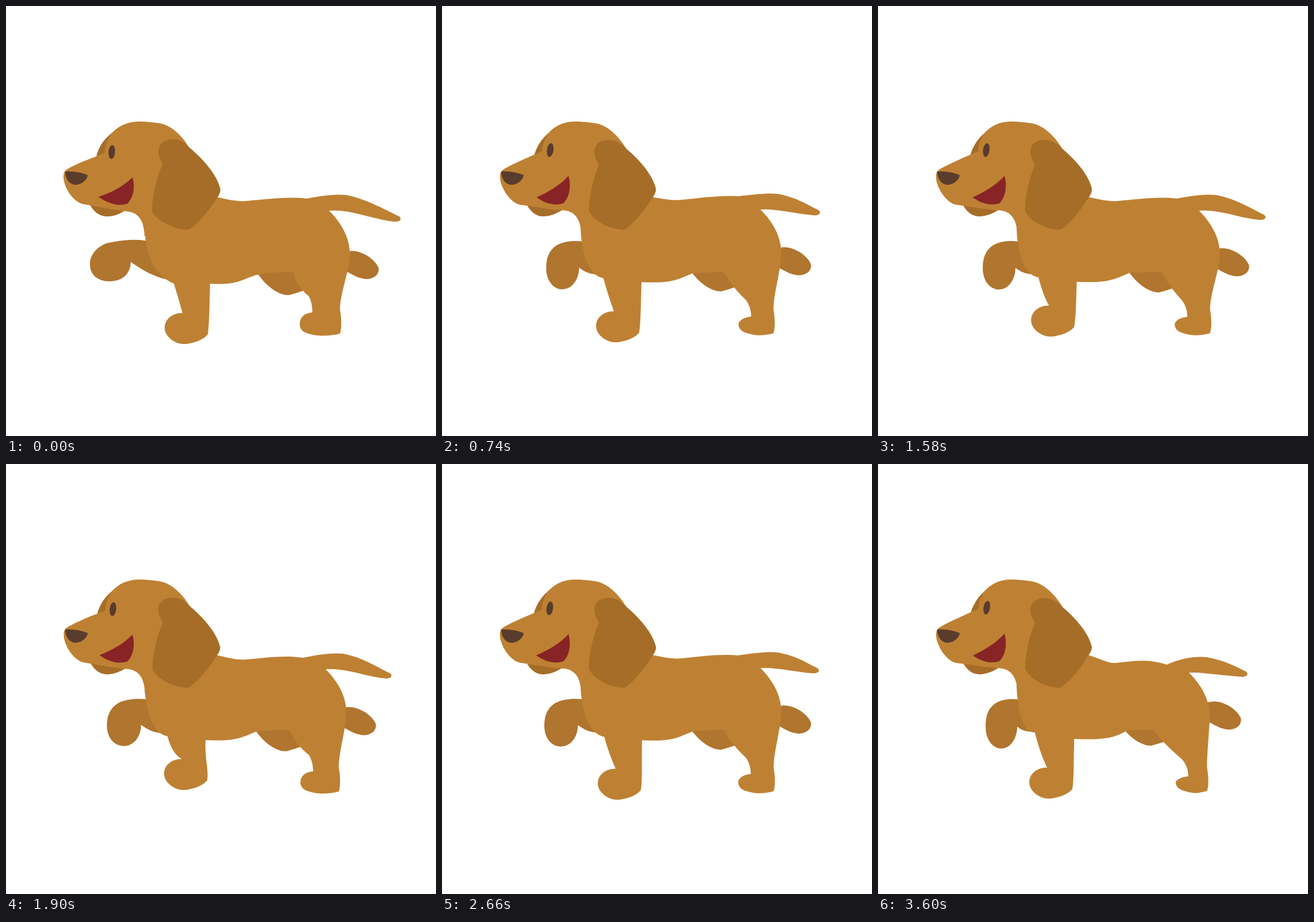
An HTML page with a canvas that plays this animation: 748 px wide and 748 px high, repeating every 3.7 s.

```html
<!DOCTYPE html>
<html lang="en">
<head>
<meta charset="utf-8">
<title>Walking puppy</title>
<style>
  html, body { margin: 0; width: 100%; height: 100%; overflow: hidden; background: #fff; }
  canvas { display: block; }
</style>
</head>
<body>
<canvas id="stage" width="748" height="748"></canvas>
<script>
const ctx = document.getElementById('stage').getContext('2d');
const LOOP = 3700, STEPS = 45;
const COAT = '#be8133', FAR = '#b0752e', EAR = '#a66d28', DARK = '#5a3c2c', MOUTH = '#882426';

// Slow sway over the loop: step, rump x/y offset, tail tip x/y, ground height.
const SWAY = [
  [0, 0, 0, 687, 372, 588],
  [9, -8, -2, 658, 361, 585],
  [15, -1, -1, 678, 368, 583],
  [23, -6, 1, 671, 370, 567],
  [33, -8, -1, 656, 361, 584],
  [39, 0, 0, 680, 372, 588],
  [44, -21, 7, 643, 367, 582]
];

// Fast leg cycle: phase, head tilt, paw curl, near front foot x, shoulder offset, hind tuck.
const CYCLE = 4.83;
const GAIT = [
  [-1.15, .4, .72, 275, -8, .2],
  [-.81, .7, .78, 271, -7, .7],
  [-.66, .85, .86, 268, -8, .8],
  [.36, .9, .93, 263, -12, .95],
  [.52, 1.05, 1.02, 263, -14, 1.15],
  [1.2, 0, 0, 276, 0, 0],
  [2.4, 0, 0, 298, 5, -.1],
  [3.68, .4, .72, 275, -8, .2]
];

// Path pairs share one structure so that their numbers can be blended.
const HEAD = [
  'M100 297C100 290 102 286 108 283C125 273 150 264 171 257C172 245 176 232 184 221C196 208 212 201 232 201C245 201 262 203 272 205C292 211 308 228 319 247L368 335L300 400L241 400C240 372 230 357 205 357C185 354 160 349 136 345C117 342 100 315 100 297Z',
  'M101 297C101 290 103 286 109 283C125 274 150 263 175 252C175 243 178 232 186 220C198 208 212 201 232 201C245 201 262 203 272 205C292 211 308 228 320 247L368 335L300 400L243 400C242 372 233 355 207 355C187 354 160 349 136 346C119 343 101 315 101 297Z'
];
const FAR_EAR = [
  'M157 262C161 245 170 232 184 221L190 250ZM146 346C153 358 162 366 176 366C190 366 200 360 207 356L170 340Z',
  'M161 259C166 243 175 229 188 219L192 250ZM149 348C155 358 164 366 177 366C191 365 201 360 209 355L172 340Z'
];
const SMILE = [
  'M161 332C185 324 205 313 220 298C225 315 222 333 211 344C196 349 178 344 161 332Z',
  'M165 333C186 323 206 311 220 295C225 312 222 333 211 343C196 348 180 344 165 333Z'
];
const NEAR_EAR = [
  'M265 254C265 238 277 232 290 232C303 232 312 238 320 247C345 268 368 295 373 319C373 325 370 330 367 334C352 357 338 374 322 387C318 390 312 390 305 388C283 384 262 372 254 358C254 330 262 300 272 276C271 270 265 264 265 254Z',
  'M265 255C265 239 277 233 290 233C303 234 312 239 320 248C345 269 367 295 372 318C372 324 370 328 366 333C351 357 337 374 321 387C318 390 312 390 305 388C283 384 263 372 256 356C256 330 263 300 273 277C271 270 265 264 265 255Z'
];
const NOSE = 'M103 288C118 287 132 290 142 294C142 302 131 311 121 311C110 311 103 300 103 288Z';
const FAR_HIND = 'M438 466C455 490 475 503 492 503C530 493 565 475 595 463C606 470 618 475 628 475C643 474 650 465 648 455C640 437 615 425 600 426C585 428 560 435 500 440Z';

const RAISED = 'M242 408C220 405 195 408 174 413C155 421 146 435 146 449C146 468 160 479 180 479C203 479 217 465 217 445C235 458 258 472 282 476L300 430Z';
const CURLED = 'M246 410C232 408 215 409 203 417C190 427 187 440 187 457C187 480 200 495 214 495C232 495 242 475 242 457C250 463 258 467 272 465L300 430Z';
const REACH = 'M244 408C215 402 175 402 140 414C112 416 96 430 96 446C97 462 115 473 135 475C155 474 165 465 172 455C200 465 240 478 285 476L300 430Z';
const PLANTED = 'M246 410C225 440 215 480 210 520C190 515 168 530 168 548C170 568 190 579 210 577C230 575 245 568 248 560C250 520 270 490 290 476L300 430Z';

const lerp = (a, b, t) => a + (b - a) * t;

function blend(a, b, t) {
  const target = b.match(/-?[\d.]+/g);
  let n = 0;
  return a.replace(/-?[\d.]+/g, v => lerp(+v, +target[n++], t).toFixed(2));
}

// Finds the keys around a position; the first entry of each key is its position.
function span(keys, at) {
  let k = 0;
  while (k < keys.length - 2 && at >= keys[k + 1][0]) k++;
  const a = keys[k], b = keys[k + 1];
  return { a, b, t: (at - a[0]) / (b[0] - a[0]) };
}

function sample(keys, at) {
  const { a, b, t } = span(keys, at);
  return a.map((v, i) => lerp(v, b[i], t));
}

const lifted = ([phase, , curl]) => [phase, blend(RAISED, CURLED, curl)];
const FAR_FRONT = [...GAIT.slice(0, 6).map(lifted), [1.95, REACH], [2.75, PLANTED], lifted(GAIT[7])];

function farFront(phase) {
  const { a, b, t } = span(FAR_FRONT, phase);
  return blend(a[1], b[1], t);
}

function fill(path, color) {
  ctx.fillStyle = color;
  ctx.fill(new Path2D(path));
}

// Each fourth step is brief: one long step, then blocks of 100, 100, 100, 20 ms.
function stepAt(ms) {
  if (ms < 100) return 0;
  const block = Math.floor((ms - 100) / 320);
  const rest = (ms - 100) % 320;
  return Math.min(STEPS - 1, 1 + block * 4 + Math.floor(rest / 100));
}

// The walk starts ahead of its even rhythm and settles into it.
function phaseAt(step) {
  const beat = step + 1.2 * Math.max(0, 1 - step / 8);
  return (beat - GAIT[0][0]) % CYCLE + GAIT[0][0];
}

function torso(rx, ry, tx, ty, hx) {
  const x = n => n + rx, y = n => n + ry, belly = hx * .35;
  return `M300 240L360 331C380 335 400 ${y(341)} ${420 + rx * .3} ${y(339)}
    C${455 + rx * .5} ${y(336)} ${x(490)} ${y(331)} ${x(523)} ${335 + ry * 2}
    C${x(550)} ${y(330)} ${x(575)} ${y(327)} ${x(593)} ${y(329)}
    C${x(627)} ${y(336)} ${tx - 28} ${ty - 18} ${tx - 3} ${ty - 6}
    C${tx + 3} ${ty - 1} ${tx - 2} ${ty + 4} ${tx - 12} ${ty + 3}
    C${tx - 37} ${ty + 1} ${x(610)} ${y(359)} ${x(588)} ${y(357)}
    Q${x(575)} ${y(355)} ${x(562)} ${y(356)}
    C${x(582)} ${y(376)} ${x(598)} ${y(402)} ${x(598)} ${y(430)}
    L${x(590)} 470L${499 + rx * .8} 463
    C480 462 458 464 ${440 + rx * .2} ${467 + belly}
    C420 471 410 ${481 + belly} 385 ${483 + belly}
    Q370 ${484 + belly} ${355 + hx} ${483 + belly}
    L${292 + hx * 1.4} ${483 + hx * 1.2}C${262 + hx * .4} 470 243 440 241 385Z`;
}

function nearFront(fx, bottom, hx) {
  const x = n => fx + n, y = n => bottom + n;
  return `M${292 + hx * 1.4} ${483 + hx * 1.2}
    Q${299 + hx * 1.2} 505 ${x(31)} ${y(-54)}
    C${x(13)} ${y(-54)} ${x(0)} ${y(-43)} ${x(0)} ${y(-28)}
    C${x(0)} ${y(-13)} ${x(18)} ${y(0)} ${x(33)} ${y(0)}
    C${x(49)} ${y(0)} ${x(69)} ${y(-8)} ${x(75)} ${y(-17)}
    C${x(78)} ${y(-35)} ${354 + hx} 515 ${355 + hx} 482
    L${355 + hx} 450L${300 + hx} 440Z`;
}

function nearHind(rx, ry, tuck, dx, dy) {
  const left = 511 + 6 * tuck + dx, right = 584 - 3 * tuck + rx * .25 + dx;
  const top = 533 + 9 * tuck + dy, base = 573 - tuck + dy;
  return `M${598 + rx} ${430 + ry}
    C${598 + rx} 460 ${right - 3} 500 ${right - 3} ${528 + dy}
    C${right} ${545 + dy} ${right} ${560 + dy} ${right - 3} ${base - 3}
    C${right - 18} ${base + 1} ${left + 34} ${base + 2} ${left + 19} ${base - 2}
    C${left + 5} ${base - 5} ${left} ${base - 11} ${left} ${base - 19}
    C${left} ${top + 9} ${left + 7} ${top + 1} ${left + 22} ${top}
    C${left + 22} ${top - 13} ${left + 19 - 2 * tuck} ${top - 23} ${left + 15 - 3 * tuck} ${top - 29}
    C${515 + rx * .3} 496 ${504 + rx * .6} 480 ${499 + rx * .8 - 3 * tuck} 462
    L530 400Z`;
}

function draw(step) {
  const phase = phaseAt(step);
  const [, rx, ry, tx, ty, ground] = sample(SWAY, step);
  const [, tilt, , fx, hx, tuck] = sample(GAIT, phase);
  // Push-off runs from the raised pose until the cycle closes.
  const push = Math.sin(Math.PI * Math.max(0, phase - 1.2) / 2.48);

  ctx.fillStyle = '#fff';
  ctx.fillRect(0, 0, 748, 748);

  fill(blend(...FAR_EAR, tilt), EAR);
  ctx.save();
  ctx.translate(520 + rx * .8, 455 + rx * .4 - 4 * tuck);
  ctx.rotate(.3 * push);
  ctx.translate(-520, -455);
  fill(FAR_HIND, FAR);
  ctx.restore();
  fill(farFront(phase), FAR);

  fill(torso(rx, ry, tx, ty, hx), COAT);
  fill(nearHind(rx, ry, tuck, 12 * push, -6 * push), COAT);
  fill(nearFront(fx, ground - 8 * push, hx), COAT);

  fill(blend(...HEAD, tilt), COAT);
  fill(blend(...SMILE, tilt), MOUTH);
  fill(NOSE, DARK);
  ctx.beginPath();
  ctx.ellipse(184 + 5 * tilt, 254 - 4 * tilt, 5.7, 12, .08 + .08 * tilt, 0, 2 * Math.PI);
  ctx.fill();
  fill(blend(...NEAR_EAR, tilt), EAR);
}

const began = performance.now();
function tick() {
  draw(stepAt((performance.now() - began) % LOOP));
  requestAnimationFrame(tick);
}
tick();
</script>
</body>
</html>
```
